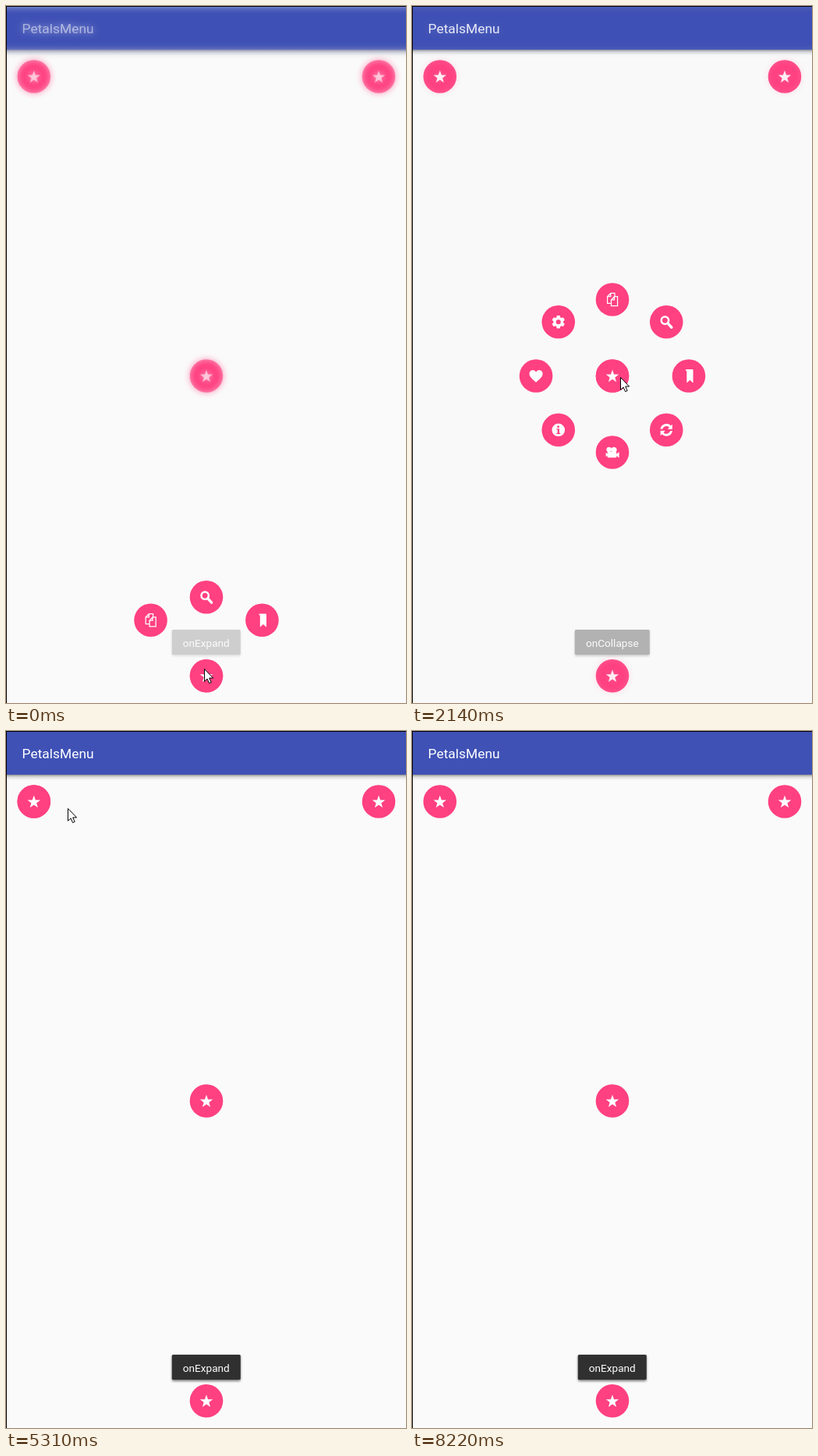
Recreate the animation shown at these times as an HTML page. Size 513 by 894 pixels, loop 8560 ms.

```html
<!DOCTYPE html>
<html lang="en">
<head>
<meta charset="utf-8">
<title>PetalsMenu</title>
<style>
html, body { margin: 0; width: 100%; height: 100%; overflow: hidden; background: #fafafa; }
svg { display: block; width: 513px; height: 894px; }
text { font-family: Roboto, sans-serif; fill: #fff; }
</style>
</head>
<body>
<svg id="stage" viewBox="0 0 513 894" xmlns="http://www.w3.org/2000/svg">
  <defs>
    <filter id="soft" filterUnits="userSpaceOnUse" x="-40" y="-40" width="593" height="974" color-interpolation-filters="sRGB">
      <feGaussianBlur stdDeviation="4.5"/>
    </filter>
    <filter id="drop" filterUnits="userSpaceOnUse" x="190" y="780" width="135" height="75">
      <feGaussianBlur stdDeviation="1.8"/>
    </filter>
    <linearGradient id="shade" x1="0" y1="0" x2="0" y2="1">
      <stop offset="0" stop-opacity=".42"/>
      <stop offset=".4" stop-opacity=".13"/>
      <stop offset="1" stop-opacity="0"/>
    </linearGradient>
  </defs>
  <rect width="513" height="894" fill="#fafafa"/>
  <g id="base"></g>
  <g id="veil">
    <rect width="513" height="894" fill="#fafafa"/>
    <g id="blurred" filter="url(#soft)"></g>
  </g>
  <g id="items"></g>
  <g id="front"></g>
  <g id="toast">
    <rect id="toastShade" y="801" height="33" rx="2" opacity=".5" filter="url(#drop)"/>
    <rect id="toastBox" y="800" height="32" rx="1.5" fill="#303030"/>
    <text id="toastText" x="256.8" y="821.6" font-size="13.6" text-anchor="middle"></text>
  </g>
  <path id="cursor" d="M.5.5V16.3L4.1 13L6.6 18.6L9.2 17.4L6.7 12H11.6Z" fill="#fff" stroke="#000" stroke-width="1"/>
  <path d="M0 .5H513M.5 0V894" stroke="#000"/>
</svg>
<script>
const LOOP = 8560, PINK = '#ff4081', PRESSED = '#e63b75', REACH = 101;
const $ = id => document.getElementById(id);

function add(parent, tag, attrs, html = '') {
  const el = document.createElementNS('http://www.w3.org/2000/svg', tag);
  for (const k in attrs) el.setAttribute(k, attrs[k]);
  el.innerHTML = html;
  parent.appendChild(el);
  return el;
}

const starPath = 'M' + Array.from({ length: 10 }, (_, i) => {
  const a = i * Math.PI / 5, r = i % 2 ? 3.5 : 8.7;
  return (r * Math.sin(a)).toFixed(2) + ' ' + (0.8 - r * Math.cos(a)).toFixed(2);
}).join('L') + 'Z';

const teeth = [0, 60, 120].map(a =>
  `<rect x="-2.3" y="-8.3" width="4.6" height="16.6" rx="1" transform="rotate(${a})"/>`).join('');

const line = (d, w) => `<path d="${d}" fill="none" stroke="#fff" stroke-width="${w}"/>`;
const arrow = '<path d="M-7.8-1.2A7.9 7.9 0 0 1 5.7-5.5L7.6-7.2V-1H1.6L3.7-3.4A5.1 5.1 0 0 0-4.9-1.2Z"/>';

const ICONS = {
  star: `<path d="${starPath}"/>`,
  copy: line('M-1.5 4.8H-6.4V-4L-2.2-8.1H3V-4.2M-6.4-3.8H-2.2V-8.1M-1.5.3L2.5-3.9H6.6V8.2H-1.5ZM-1.5.3H2.5V-3.9', 1.25),
  search: '<circle cx="-1.8" cy="-2" r="4.7" fill="none" stroke="#fff" stroke-width="2.5"/>' +
    '<path d="M2.4 2.4L6.6 7" stroke="#fff" stroke-width="3.4" stroke-linecap="round"/>',
  mark: '<path d="M-4.5-7.6Q-3.8-8.4-2.5-8.4H4.6Q5.6-8.4 5.6-7.4V9L1.4 5.2L-2.6 9V-5.4Q-2.8-7-4.5-7.6Z"/>',
  sync: arrow + `<g transform="rotate(180)">${arrow}</g>`,
  film: '<circle cx="-4.3" cy="-3.4" r="3.3"/><circle cx="2" cy="-3.1" r="3.6"/>' +
    '<rect x="-6.3" y="-.5" width="11.6" height="7.4" rx="1"/><path d="M5 2.5L8.6-.4V7L5 4.4Z"/><path d="M-8.4.2L-6 2V4.4L-8.4 5.6Z"/>',
  info: `<circle r="8.3"/><g fill="${PINK}"><circle cx="-.2" cy="-4" r="1.4"/><path d="M-2.4-1.6H1.2V4.1H2.5V5.2H-2.5V4.1H-1.1V-.5H-2.4Z"/></g>`,
  heart: '<path d="M0 8.2C-3.5 5.1-8.6 1.6-8.6-2.9C-8.6-7.8-2.4-9.2 0-4.9C2.4-9.2 8.6-7.8 8.6-2.9C8.6 1.6 3.5 5.1 0 8.2Z"/>',
  gear: `<circle r="6.4"/>${teeth}<circle r="3" fill="${PINK}"/>`
};

function button(parent, icon, x, y) {
  const g = add(parent, 'g', { fill: '#fff' }, `<circle r="21.3" fill="${PINK}"/>${ICONS[icon]}`);
  move(g, x, y);
  return g;
}
const move = (el, x, y) => el.setAttribute('transform', `translate(${x.toFixed(2)} ${y.toFixed(2)})`);
const show = (el, on) => el.setAttribute('display', on ? 'inline' : 'none');
const clamp = v => Math.max(0, Math.min(1, v));
const ease = v => 0.5 - 0.5 * Math.cos(Math.PI * clamp(v));

// Fan entries sit at an angle (clockwise from the top); the list drops straight down.
const fan = (names, from) => names.map((icon, i) => {
  const a = (from + 45 * i) * Math.PI / 180;
  return { icon, dx: REACH * Math.sin(a), dy: -REACH * Math.cos(a) };
});
const trio = ['copy', 'search', 'mark'];
const menus = [
  { x: 257, y: 859.2, open: -310, close: 880, items: fan(trio, -45) },
  { x: 257, y: 474.5, open: 1900, close: 3000,
    items: fan([...trio, 'sync', 'film', 'info', 'heart', 'gear'], 0) },
  { x: 35.8, y: 90.5, open: 4080, close: 5030, items: fan(trio, 90) },
  { x: 478, y: 90.5, open: 5930, close: 7020,
    items: trio.map((icon, i) => ({ icon, dx: 0, dy: 51.2 * (3 - i) })) }
];

function drawBar(parent) {
  add(parent, 'rect', { x: -40, y: 56, width: 593, height: 7, fill: 'url(#shade)' });
  add(parent, 'rect', { x: -40, y: 1, width: 593, height: 55, fill: '#3f51b5' });
  add(parent, 'text', { x: 20.6, y: 35.2, 'font-size': 17.4 }).textContent = 'PetalsMenu';
}
drawBar($('base'));
drawBar($('blurred'));
for (const m of menus) {
  button($('base'), 'star', m.x, m.y);
  m.soft = button($('blurred'), 'star', m.x, m.y);
  for (const it of m.items) it.el = button($('items'), it.icon, m.x, m.y);
  m.main = button($('front'), 'star', m.x, m.y);
}

// The picture only refreshes at these moments.
const bursts = [
  [0, 450, 3], [880, 1420, 4], [1420, 1870, 3], [1990, 2290, 2], [3000, 3150, 1], [3150, 3930, 6],
  [4080, 4320, 2], [4320, 4470, 1], [5030, 5310, 2], [5310, 6040, 5], [6190, 6320, 1],
  [7020, 7170, 1], [7170, 7980, 6], [8100, 8220, 1]
];
const ticks = bursts.flatMap(([a, b, n]) =>
  Array.from({ length: n + 1 }, (_, i) => Math.round(a + (b - a) * i / n)));

const path = [
  [0, 254, 850], [1100, 254, 850], [1285, 275, 740], [1420, 276, 511], [1870, 267, 476],
  [3280, 267, 476], [3930, 44, 104], [5170, 44, 104], [5310, 79, 99], [5890, 473, 100],
  [7290, 473, 100], [7440, 485, 300], [7710, 486, 680], [7845, 470, 775], [7980, 480, 900]
];
const toasts = [[-25, 'onExpand'], [2100, 'onCollapse'], [4150, 'onExpand'], [6170, 'onCollapse'], [8105, 'onExpand']];

function drawCursor(t) {
  const i = path.findIndex(p => p[0] > t);
  show($('cursor'), i > 0);
  if (i < 1) return;
  const [t0, x0, y0] = path[i - 1], [t1, x1, y1] = path[i], k = (t - t0) / (t1 - t0);
  move($('cursor'), x0 + (x1 - x0) * k, y0 + (y1 - y0) * k);
}

function drawToast(t) {
  const i = toasts.findLastIndex(s => s[0] <= t), text = toasts[i][1];
  const next = i + 1 < toasts.length ? toasts[i + 1][0] : Infinity;
  const w = text === 'onExpand' ? 88 : 96;
  for (const id of ['toastShade', 'toastBox']) {
    $(id).setAttribute('x', 256.8 - w / 2);
    $(id).setAttribute('width', w);
  }
  $('toastText').textContent = text;
  $('toast').setAttribute('opacity', clamp(Math.min(t - toasts[i][0], next - t) / 115));
}

function drawMenu(m, t) {
  const up = t - m.open, down = t - m.close;
  const spread = down < 0 ? ease(up / 270) : 1 - ease((down - 30) / 250);
  const blur = down < 0 ? clamp((up - 210) / 180) : 1 - clamp((down - 20) / 137);
  const active = up >= 0 && down < 400;
  const pressed = (up >= 0 && up < 150) || (down >= 0 && down < 130);
  for (const it of m.items) {
    show(it.el, active && spread > 0.01);
    move(it.el, m.x + it.dx * spread, m.y + it.dy * spread);
  }
  show(m.main, active);
  show(m.soft, !active);
  m.main.firstChild.setAttribute('fill', pressed ? PRESSED : PINK);
  return active ? blur : 0;
}

function render(time) {
  const now = time % LOOP;
  const t = ticks.reduce((last, s) => s <= now ? s : last, 0);
  const blur = Math.max(...menus.map(m => drawMenu(m, t)));
  show($('veil'), blur > 0);
  $('veil').setAttribute('opacity', blur);
  drawToast(t);
  drawCursor(t);
}

const start = performance.now();
function loop() {
  render(performance.now() - start);
  requestAnimationFrame(loop);
}
loop();
</script>
</body>
</html>
```
